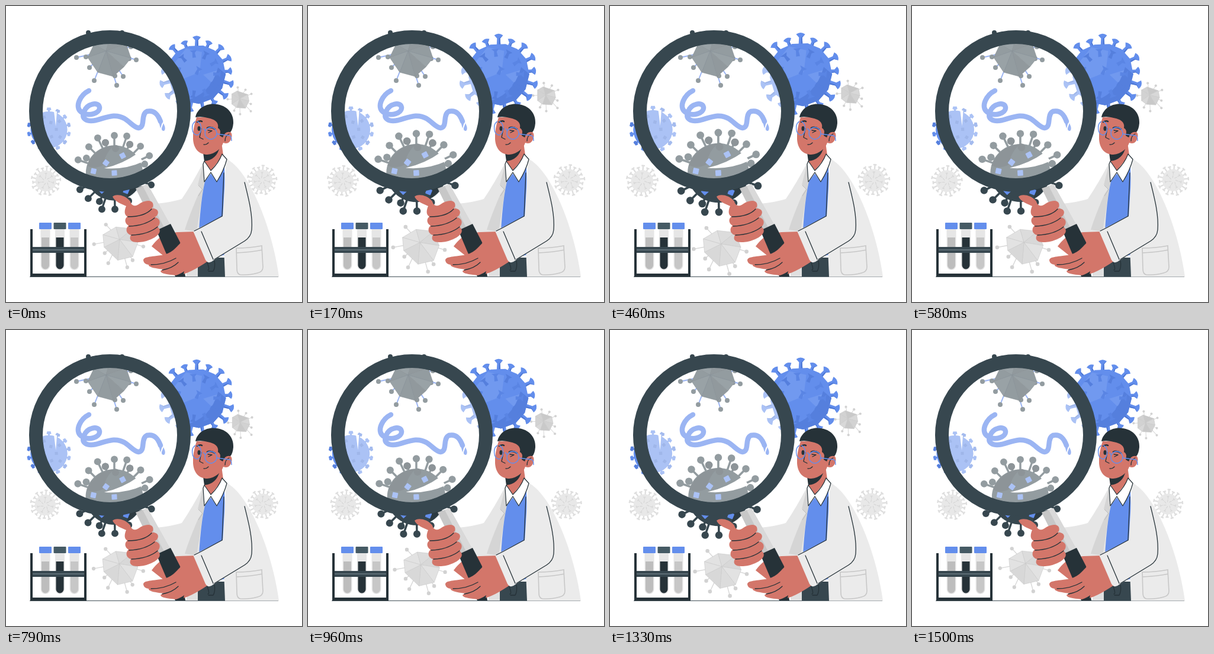
Recreate the animation shown at these times as an HTML page. Size 500x500 px, loop 1540 ms.

```html
<!DOCTYPE html>
<html lang="en">
<head>
<meta charset="utf-8">
<title>Virus research</title>
<style>
html, body { margin: 0; width: 100%; height: 100%; overflow: hidden; background: #fff; }
svg { display: block; width: 100%; height: 100%; }
.line { fill: none; stroke: #263238; stroke-width: 1.3; stroke-linecap: round; stroke-linejoin: round; }
.skin { fill: #d3766a; }
.coat { fill: #ebebeb; }
.dark { fill: #263238; }
.slate { fill: #37474f; }
.blue { fill: #638eec; }
</style>
</head>
<body>
<svg viewBox="0 0 500 500">
  <path d="M40 457.3H460" stroke="#37474f"/>
  <g id="pale"></g>
  <g id="big"></g>
  <g id="small"></g>
  <g id="black"></g>
  <g id="top"></g>
  <g id="worm" fill="none" stroke="#4675e8" stroke-width="8.5" stroke-linecap="round">
    <path d="M140 143C126 150 115 170 127 179C140 188 159 181 158 171C156 161 137 165 132 178C126 192 138 196 152 193C171 188 184 181 200 190C211 197 216 205 224 206C236 205 227 183 238 178C251 175 257 184 261 195"/>
    <path d="M257 188L261 203L263 196Z" stroke-width="2" fill="#4675e8"/>
    <path d="M266 198Q271 208 267 211Q262 211 263 206Z" stroke="none" fill="#4675e8"/>
  </g>
  <circle cx="175.5" cy="177.5" r="114" fill="#fff" opacity=".46"/>
  <circle cx="175.5" cy="177.5" r="125" fill="none" stroke="#37474f" stroke-width="23"/>

  <g id="rack">
    <g id="tubes"></g>
    <path class="slate" d="M44 407H133V417H44Z"/>
    <path d="M44 412H133" stroke="#6b7b83" stroke-width="1.5"/>
    <path class="dark" d="M41 377H45V452H132V377H136V457.5H41Z"/>
  </g>

  <g id="man">
    <path d="M253 334Q282 331 297 326Q315 299 333 265L344 300L326 384L270 382Z" fill="#e6e6e6"/>
    <path d="M333 266L335 298L322 381L302 378Q309 355 325 318L331 309L324 302Z" fill="#d5d5d5"/>
    <path d="M325 303L332 310L325 321" fill="none" stroke="#bbb"/>
    <path class="slate" d="M324 425H370V457H324Z"/>
    <path class="blue" d="M336 296L346 283L356 297L369 270L372 420L324 430Q326 340 336 296Z"/>
    <path d="M305 430L324 424V457H305Z" fill="#e0e0e0"/>
    <path class="coat" d="M372 258C410 277 449 371 461 457.5H370L366 358Z"/>
    <path class="line" d="M368 282L365 355"/>
    <path class="line" d="M339 431Q345 446 341 446M352 430Q354 441 350 448H342"/>
    <path d="M389 409Q411 409 432 405L434 441Q434 449 425 451Q409 455 396 454Q390 453 390 444Z M389 417Q414 416 433 412" fill="none" stroke="#c7c7c7" stroke-width="1.6"/>

    <path class="skin" d="M334 245L335 262L346 278L367 252L364 230Z"/>
    <path class="dark" d="M333 248Q348 252 361 238Q356 260 335 262Z"/>
    <path fill="#fff" stroke="#263238" stroke-width="1.2" stroke-linejoin="round" d="M335 262L333 267L335 297L346 281L356 297Q368 278 373 259L365 250Q359 266 346 278Z"/>
    <path class="skin" d="M322 188Q315 208 316 225C317 242 327 251 340 251C354 250 364 240 367 231Q377 235 381 223C384 212 375 208 369 214L362 188Z"/>
    <path class="dark" d="M320 188C323 172 340 163 356 166C372 168 385 180 384 198Q383 209 379 213Q370 211 366 222L361 219Q364 209 358 206Q360 194 345 190Q331 186 320 188Z"/>
    <path class="line" d="M377 216Q370 219 370 228M330 207L327 222L333 225M334 234Q338 235 342 231M341 210L348 211L342 214"/>
    <path class="line" stroke-width="4" d="M323 196Q328 193 331 195M340 206Q346 203 353 208" style="stroke-width:2.6"/>
    <ellipse class="dark" cx="326" cy="207" rx="2.5" ry="4"/>
    <path d="M320 195C312 199 313 216 322 218C331 218 333 198 323 195M333 208Q335 206 336 211M356 216L378 219Q381 220 381 228" fill="none" stroke="#638eec" stroke-width="1.4"/>
    <circle cx="346" cy="215" r="10" fill="none" stroke="#638eec" stroke-width="1.4"/>

    <path class="skin" d="M246 406C263 383 276 384 290 382L320 381L330 415L270 425Z"/>
    <path d="M219 308L239 301L277 369L254 379Z" fill="#c7c7c7"/>
    <path d="M231 304L239 301L277 369L267 374Z" fill="#d9d9d9"/>
    <path class="dark" d="M254 379L278 368L294 399L303 457H286L282 445Z"/>
    <path class="skin" d="M232 430C232 424 240 424 262 421C280 418 285 410 294 401L318 383L341 431C322 444 304 454 287 455C270 453 262 452 261 448Q262 446 267 445C247 443 240 440 241 437Q233 436 232 430Z"/>
    <path class="line" d="M245 437Q268 437 287 426M264 446Q281 443 291 433"/>
    <path class="dark" d="M285 456Q296 452 301 448L299 457Z"/>
    <path class="coat" d="M316 380L366 355Q376 315 402 298C410 326 417 353 415 378Q414 390 403 397L350 430Q342 437 337 429Z"/>
    <path class="line" d="M365 355L330 374L318 380M330 381L350 428M403 298C410 326 417 353 415 378Q414 390 403 397L352 428"/>
    <path class="skin" d="M180 322C184 317 201 318 210 330C212 338 218 339 224 335C234 328 245 327 248 333Q250 339 246 342C259 341 260 352 251 357C261 358 262 368 256 373C263 379 260 385 251 391Q239 398 225 399C211 400 207 394 211 387C203 385 201 376 207 371C200 367 200 359 205 356C199 352 200 345 203 338C196 335 183 330 180 322Z"/>
    <path class="line" d="M206 356Q234 356 246 343M208 372Q235 371 251 358M212 387Q240 386 256 373"/>
  </g>
</svg>
<script>
const el = id => document.getElementById(id);
const around = (n, fn) => Array.from({ length: n }, (_, i) => fn(i * 360 / n, i)).join('');
const place = (x, y, angle, shape) => `<g transform="translate(${x} ${y}) rotate(${angle})">${shape}</g>`;
const path = (d, fill, extra = '') => `<path d="${d}" fill="${fill}" ${extra}/>`;
const pairs = list => list.split(' ').map(p => p.split(',').map(Number));

// Round virus with T-shaped pins
function pinned(x, y) {
  const pin = r => `<path d="M0 -14V${-r}M-2.6 ${-r}H2.6" stroke="#dedede" stroke-width="2.2"/>`;
  return around(18, (a, i) => place(x, y, a + 4, pin(i % 2 ? 22 : 24.5))) +
    `<circle cx="${x}" cy="${y}" r="17.5" fill="#e8e8e8"/>` +
    around(7, a => place(x, y, a, '<path d="M0 -9V-13M-2 -13H2M2 -3L6 -5" stroke="#d4d4d4" fill="none"/>'));
}

// Faceted virus: body corners, knobs on stems, and an inner hub for the facets
function faceted([hx, hy], corners, knobs, c) {
  const pts = pairs(corners);
  let s = pairs(knobs).map(([x, y]) =>
    `<path d="M${hx} ${hy}L${x} ${y}" stroke="${c.stem}" stroke-width="${c.width}"/><circle cx="${x}" cy="${y}" r="${c.r}" fill="${c.knob}"/>`).join('');
  pts.forEach(([x, y], i) => {
    const [u, v] = pts[(i + 1) % pts.length];
    s += path(`M${hx} ${hy}L${x} ${y}L${u} ${v}Z`, c.faces[i % c.faces.length], `stroke="${c.edge}" stroke-width=".6" stroke-linejoin="round"`);
  });
  return s;
}

const pale = { stem: '#d9d9d9', width: 1.4, r: 3.1, knob: '#d2d2d2', edge: '#c9c9c9', faces: ['#e2e2e2', '#dcdcdc', '#d8d8d8'] };
el('pale').innerHTML = pinned(68, 295.5) + pinned(432, 294) +
  faceted([192, 394], '164,386 186,373 214,376 223,399 214,423 189,429 166,407',
    '169,369 183,379 211,375 149,402 167,417 173,434 205,441 214,429 232,406', pale) +
  faceted([394, 157], '381,149 390,144 408,150 410,161 404,173 389,172 381,166',
    '391,138 404,142 414,149 413,166 413,178 395,183 385,177 374,158',
    { ...pale, r: 2, width: 1, faces: ['#d2d2d2', '#c9c9c9', '#d8d8d8'] });

const horn = 'M-3.5 -40L-2.5 -57L-7 -62Q0 -67 7 -62L2.5 -57L3.5 -40Z';
const hornShade = 'M0 -40L1 -57L7 -62L2.5 -57L3.5 -40Z';
const stub = 'M-3 4L-2 -5L-6 -9L6 -8L2 -4L3 4Z';
el('big').innerHTML =
  around(17, (a, i) => `<g transform="translate(322 115) rotate(${a}) scale(${i % 3 == 1 ? .93 : 1})">${path(horn, '#638eec') + path(hornShade, '#4e78d5')}</g>`) +
  path('M278 91L289 77L309 68L333 67L352 75L366 91L371 115L365 139L350 156L326 165L301 160L282 146L274 120Z', '#638eec') +
  path('M304 72L331 78L327 112L292 126L280 102Z M333 116L359 108L352 134Z', '#7199ef') +
  path('M371 115L365 139L350 156L326 165L301 160Q345 151 358 104Z', '#557fdd') +
  around(11, (a, i) => place(322 + 32 * Math.cos(a * Math.PI / 180), 115 + 32 * Math.sin(a * Math.PI / 180), a + 90, path(stub, i % 2 ? '#557fdd' : '#5a85e4'))) +
  place(323, 112, 25, path(stub, '#5a85e4'));

el('small').innerHTML =
  around(14, (a, i) => place(72.5, 208.5, a, path('M-1.5 -28V-32L-4 -33L-3 -37H3L4 -33L1.5 -32V-28Z', i % 2 ? '#5680de' : '#638eec'))) +
  '<circle cx="72.5" cy="209" r="31" fill="#638eec"/>' +
  around(10, (a, i) => place(72.5, 209, a + 15, `<rect x="-2.5" y="${i % 2 ? -25 : -15}" width="5" height="5" fill="#4e78d5"/>`)) +
  path('M81 178L84 203L86 178Z', '#fff');

const knobs = '204,220 183,219 155,223 168,231 140,238 122,260 136,257 185,241 209,234 227,237 242,253 234,267 245,302 228,310 207,329 184,343 162,343 158,330 139,325 125,310';
el('black').innerHTML =
  pairs(knobs).map(([x, y]) => `<path d="M183 281L${x} ${y}" stroke="#37474f" stroke-width="3.4"/><circle cx="${x}" cy="${y}" r="5.9" fill="#37474f"/>`).join('') +
  '<ellipse cx="183" cy="282" rx="48" ry="46.5" fill="#37474f"/>' +
  path('M137 270Q150 238 183 236Q169 246 164 269Q150 276 137 270Z M204 300Q226 294 231 278Q231 306 205 323Z', '#2c3a41') +
  pairs('168,231 185,241 209,234').map(([x, y]) => `<circle cx="${x}" cy="${y}" r="6" fill="#2c3a41"/>`).join('') +
  path('M166 274Q197 267 222 249L231 263Q201 277 166 274Z', '#fff') +
  pairs('148,279 169,265 197,253 183,282 203,312 162,311').map(([x, y], i) => place(x, y, i * 25 + 12, '<rect x="-4.5" y="-4.5" width="9" height="9" rx="1" fill="#638eec"/>')).join('');

el('top').innerHTML = faceted([169, 76], '138,87 149,64 175,55 203,64 211,88 199,103 181,119 155,112',
  '119,87 135,86 141,104 149,126 187,134 198,119 184,118 208,89 220,91 139,45 196,45 211,69',
  { stem: '#4675e8', width: 2, r: 4, knob: '#37474f', edge: '#25343b', faces: ['#37474f', '#42525a', '#344249'] });

const tube = (x, cap, fluid) =>
  `<path d="M${x - 8} 376H${x + 8}V438A8 8 0 0 1 ${x - 8} 438Z" fill="#e6e6e6"/>` +
  `<path d="M${x - 6.5} 391H${x + 6.5}V438A6.5 6.5 0 0 1 ${x - 6.5} 438Z" fill="${fluid}"/>` +
  `<rect x="${x - 10.5}" y="366" width="21" height="11" rx="1" fill="${cap}"/>`;
el('tubes').innerHTML = tube(66.5, '#638eec', '#bdbdbd') + tube(91, '#455a64', '#263238') + tube(115.5, '#638eec', '#c7c7c7');

// Two heartbeats per loop: [time, swell]
const LOOP = 1540;
const beats = [[-20, 0], [332, 1], [860, .02], [1190, .97], [1520, 0], [1872, 1]];
function swell(t) {
  const i = beats.findIndex(b => b[0] > t) - 1;
  const [t0, a] = beats[i], [t1, b] = beats[i + 1];
  const u = (t - t0) / (t1 - t0);
  return a + (b - a) * (u + (1 - Math.cos(Math.PI * u)) / 2) / 2;
}

const pulsing = { pale: [250, 289, .093], big: [322, 115, .105], small: [72.5, 208.5, .09], black: [184, 281, .1] };
const start = performance.now();
function draw() {
  const p = swell((performance.now() - start) % LOOP);
  for (const [id, [x, y, gain]] of Object.entries(pulsing))
    el(id).setAttribute('transform', `translate(${x} ${y}) scale(${1 + gain * p}) translate(${-x} ${-y})`);
  requestAnimationFrame(draw);
}
draw();
</script>
</body>
</html>
```
